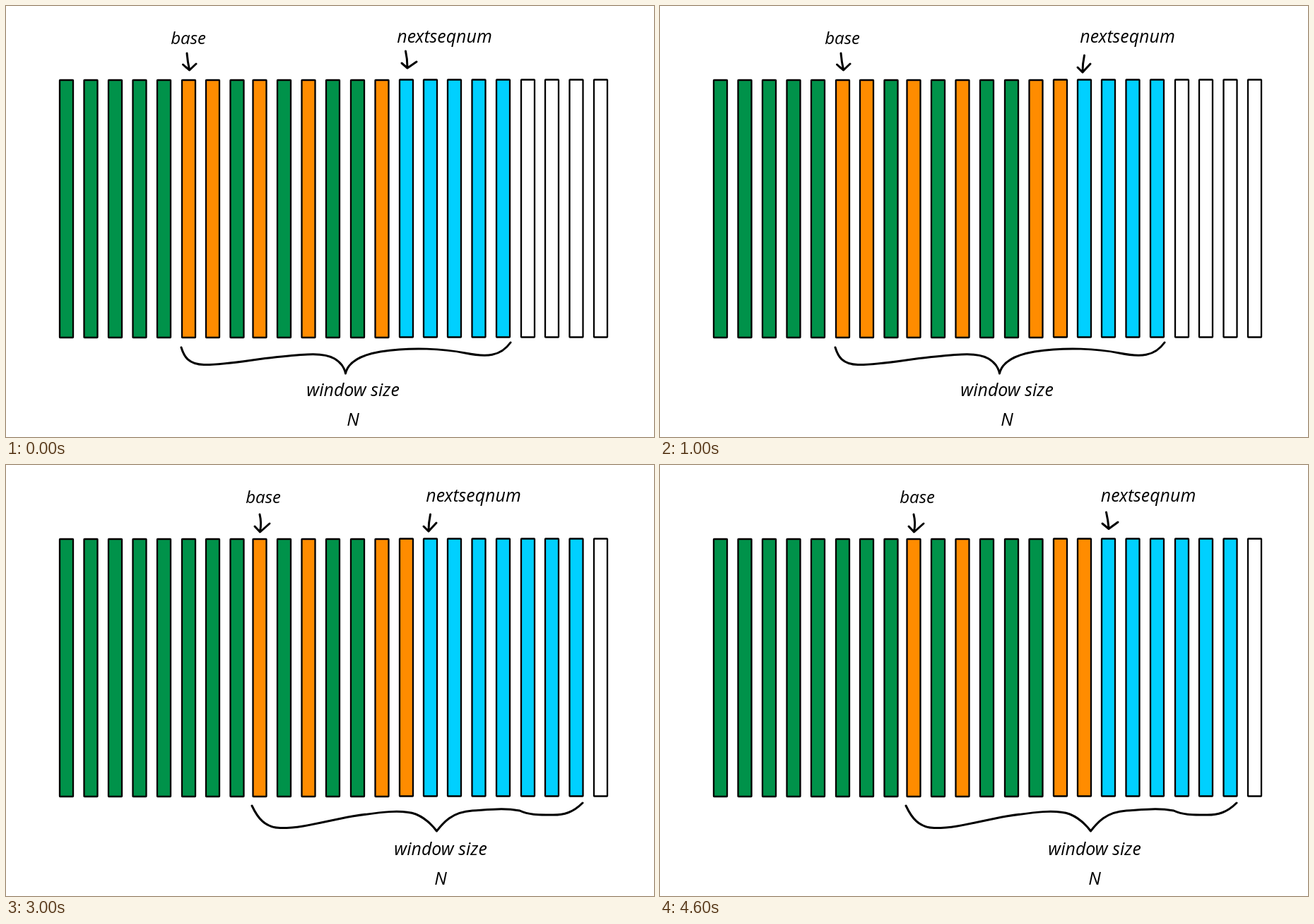
Write an HTML page that moves like this. It is 917 by 611 pixels and loops after 5 s.

```html
<!DOCTYPE html>
<html lang="en">
<head>
<meta charset="utf-8">
<title>Sliding window</title>
<style>
  html, body { margin: 0; width: 100%; height: 100%; overflow: hidden; background: #fff; }
  svg { display: block; width: 917px; height: 611px; }
  text { font: italic 25px "Open Sans", "Noto Sans", sans-serif; text-anchor: middle; }
  path { fill: none; stroke: #000; stroke-width: 3; stroke-linecap: round; stroke-linejoin: round; }
  rect { stroke: #000; stroke-width: 2.3; }
</style>
</head>
<body>
<svg viewBox="0 0 917 611">
  <g id="bars"></g>
  <text id="baseText" y="54" style="font-size:24px">base</text>
  <path id="baseArrow"/>
  <text id="nextText" y="52">nextseqnum</text>
  <path id="nextArrow"/>
  <path id="brace"/>
  <text id="sizeText" y="553">window size</text>
  <text id="countText" y="595">N</text>
</svg>
<script>
const $ = id => document.getElementById(id);
const STEP = 1000;
const COLORS = { G: '#00924a', O: '#ff8c00', B: '#00d0ff', W: '#ffffff' };
const LEFTS = [75, 109.5, 144, 178.5, 213, 248, 282, 316.5, 348.5, 383, 417.5, 452,
               487, 521.5, 556, 590, 624, 658.5, 693, 728, 762, 796.5, 831];

const BASES = [
  { x: 258, arrow: 'M256 67Q257 79 259.5 90M250.5 83L259.5 91L269 82' },
  { x: 364, arrow: 'M359 70Q362 82 359.5 94M352 87L359.5 95L373 83' }
];
const NEXTS = [
  { x: 620.5, arrow: 'M565.5 64Q568 75 568 87M560 81L568 88L581 79' },
  { x: 661.5, arrow: 'M600.5 70Q598 82 598 93M591 87L598 94L609 82' },
  { x: 691, arrow: 'M631.5 67Q634 78 635 89M626 83L635 90.5L648 81' }
];
const WINDOWS = [
  { x: 491, brace: 'M248 484C252 497 258 508 280 508.5C310 509 350 501 380 498C420 494 448 490 465 500' +
      'C475 506 479 513 480.5 521C484 505 500 495 530 490C575 483 620 486 650 492C680 498 700 497 714 477' },
  { x: 615, brace: 'M348 483C356 500 366 514 388 514.5C420 515 450 505 490 498C530 492 560 488 580 495' +
      'C592 500 602 509 609.5 519C618 508 630 492 660 490C690 488 705 486 727 490' +
      'C740 496 752 496 770 496C790 497 803 492 816 479' }
];

// One letter per bar, then the base, next and window poses.
const STEPS = [
  ['GGGGGOOGOGOGGOBBBBBWWWW', 0, 0, 0],
  ['GGGGGOOGOGOGGOOBBBBWWWW', 0, 1, 0],
  ['GGGGGOGGOGOGGOOBBBBWWWW', 0, 1, 0],
  ['GGGGGGGGOGOGGOOBBBBBBBW', 1, 1, 1],
  ['GGGGGGGGOGOGGGOOBBBBBBW', 1, 2, 1]
];

const bars = LEFTS.map((left, i) => {
  const bar = document.createElementNS('http://www.w3.org/2000/svg', 'rect');
  const box = { x: left + 1, y: i < 14 ? 105 : 104.5, width: 19, height: 365, rx: 0.5 };
  for (const key in box) bar.setAttribute(key, box[key]);
  return $('bars').appendChild(bar);
});

function show([fills, base, next, win]) {
  bars.forEach((bar, i) => bar.setAttribute('fill', COLORS[fills[i]]));
  $('baseText').setAttribute('x', BASES[base].x);
  $('baseArrow').setAttribute('d', BASES[base].arrow);
  $('nextText').setAttribute('x', NEXTS[next].x);
  $('nextArrow').setAttribute('d', NEXTS[next].arrow);
  $('sizeText').setAttribute('x', WINDOWS[win].x);
  $('countText').setAttribute('x', WINDOWS[win].x);
  $('brace').setAttribute('d', WINDOWS[win].brace);
}

let start = null, shown = 0;
function tick(now) {
  if (start === null) start = now;
  const step = Math.floor((now - start) / STEP) % STEPS.length;
  if (step !== shown) show(STEPS[shown = step]);
  requestAnimationFrame(tick);
}
show(STEPS[0]);
requestAnimationFrame(tick);
</script>
</body>
</html>
```
